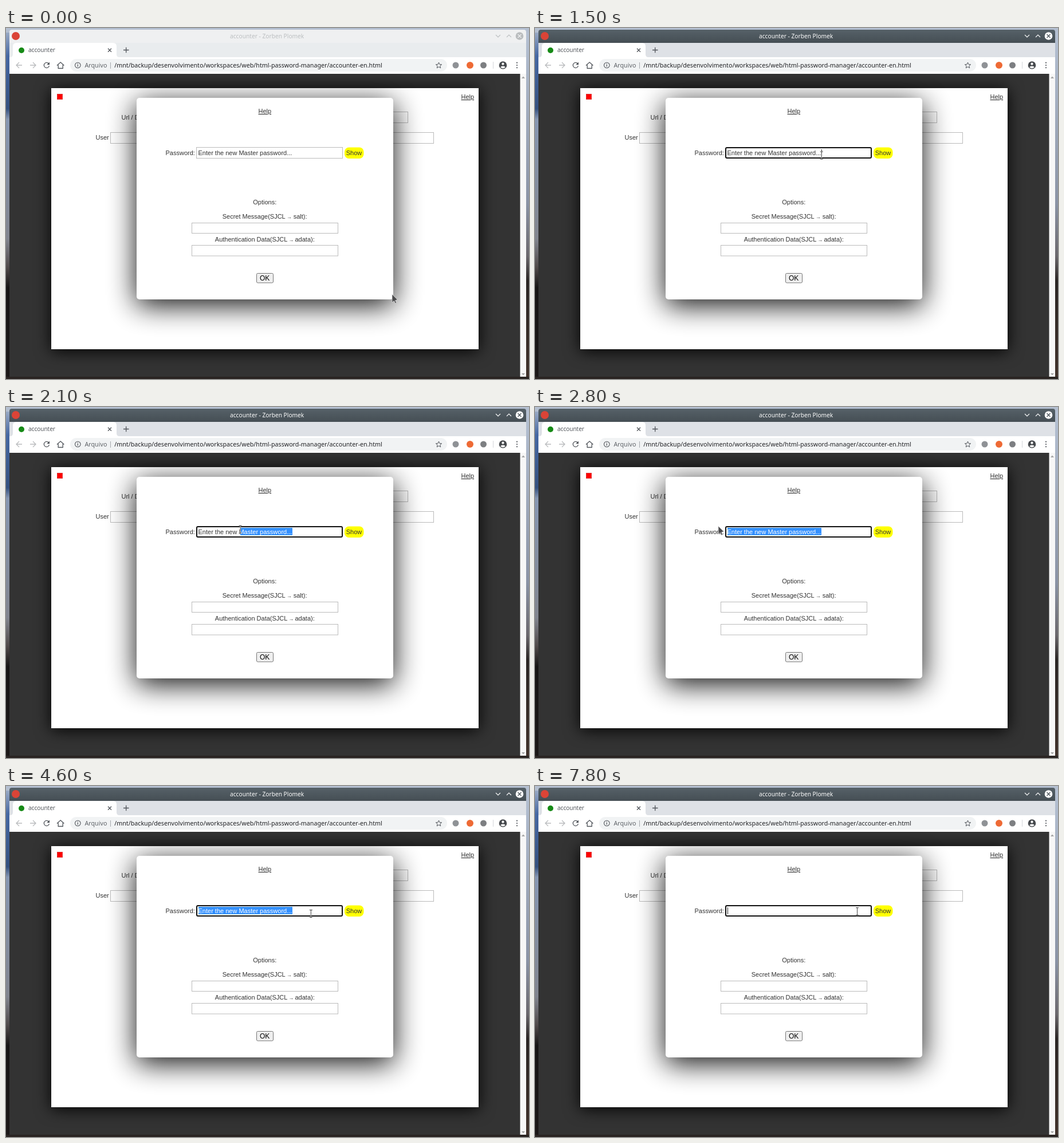
Animation, 913 px wide and 613 px high, one loop 8000 ms. Source, as an HTML page:

```html
<!DOCTYPE html>
<html lang="en">
<head>
<meta charset="utf-8">
<title>accounter</title>
<style>
html, body { margin: 0; width: 100%; height: 100%; overflow: hidden; background: #333; }
svg { display: block; }
text { font: 11px "Liberation Sans", Arial, sans-serif; fill: #333; white-space: pre; }
.ui { font-family: "Noto Sans", sans-serif; }
.link { text-decoration: underline; }
.field { fill: #fff; stroke: #bbb; }
.arrow { font-size: 9px; text-anchor: middle; }
.icon { fill: none; stroke: #50545a; stroke-width: 1.3; }
#frame { --bar: #eff0f1; --strip: #e9ecee; --ink: #bcbfc1; --disc: #b9bcbe; --cross: #eff0f1; }
#frame.active { --bar: url(#steel); --strip: #dee1e6; --ink: #fcfcfc; --disc: #fcfcfc; --cross: #475057; }
</style>
</head>
<body>
<svg width="913" height="613" viewBox="0 0 913 613">
  <defs>
    <linearGradient id="steel" x2="0" y2="1">
      <stop stop-color="#566168"/><stop offset="1" stop-color="#454e54"/>
    </linearGradient>
    <linearGradient id="skyL" x2="0" y2="1">
      <stop stop-color="#a9b6ca"/><stop offset=".08" stop-color="#4668a3"/>
      <stop offset=".23" stop-color="#35517f"/><stop offset=".26" stop-color="#8797b2"/>
      <stop offset=".6" stop-color="#82858f"/><stop offset=".68" stop-color="#514b4b"/>
      <stop offset=".74" stop-color="#171515"/><stop offset="1" stop-color="#1c1818"/>
    </linearGradient>
    <linearGradient id="skyR" x2="0" y2="1">
      <stop stop-color="#b6c2d4"/><stop offset=".5" stop-color="#8a93a5"/>
      <stop offset=".65" stop-color="#6a676c"/><stop offset=".72" stop-color="#2a2524"/>
      <stop offset="1" stop-color="#41322b"/>
    </linearGradient>
    <clipPath id="selClip"><rect id="selBox" y="211" height="13"/></clipPath>
  </defs>

  <!-- page -->
  <rect width="913" height="613" fill="#333"/>
  <rect x="79" y="108" width="746" height="456" style="filter:blur(14px)"/>
  <rect x="79" y="105" width="746" height="456" fill="#fff"/>
  <rect x="89.5" y="115.5" width="9" height="9" fill="red" stroke="#d33"/>
  <text class="link" x="794.5" y="124">Help</text>
  <text x="201.5" y="160">Url / Domain</text>
  <rect class="field" x="270.5" y="146.5" width="431" height="19"/>
  <text x="156.5" y="195">User</text>
  <rect class="field" x="182.5" y="182.5" width="564" height="19"/>

  <!-- dialog -->
  <rect x="228" y="132" width="448" height="352" opacity=".95" style="filter:blur(25px)"/>
  <rect x="228" y="122" width="448" height="352" rx="5" fill="#fff"/>
  <text class="link" x="440.5" y="149">Help</text>
  <text x="278.5" y="222">Password:</text>
  <rect class="field" id="idle" x="332.5" y="208.5" width="255" height="19"/>
  <rect id="focus" x="333" y="209" width="254" height="18" rx="2" fill="#fff" stroke="#101010" stroke-width="2"/>
  <g id="prompt">
    <text x="335.5" y="221.5">Enter the new Master password...</text>
    <g clip-path="url(#selClip)">
      <rect x="336" y="211" width="164" height="13" fill="#3390ff"/>
      <text x="335.5" y="221.5" style="fill:#fff">Enter the new Master password...</text>
    </g>
  </g>
  <rect id="caret" y="212" width="1" height="12" fill="#222"/>
  <rect x="591" y="208.5" width="33.5" height="19.5" rx="7.5" fill="#ff0"/>
  <text x="593.7" y="221.5">Show</text>
  <text x="431.3" y="308">Options:</text>
  <text x="377.7" y="333">Secret Message(SJCL</text>
  <text class="arrow" x="494.5" y="333">→</text>
  <text x="501.7" y="333">salt):</text>
  <rect class="field" x="324.5" y="340.5" width="255" height="18"/>
  <text x="364.8" y="373">Authentication Data(SJCL</text>
  <text class="arrow" x="498" y="373">→</text>
  <text x="504.5" y="373">adata):</text>
  <rect class="field" x="324.5" y="379.5" width="255" height="18.5"/>
  <rect x="437.5" y="428.5" width="29" height="16.5" rx="2" fill="#efefef" stroke="#767676"/>
  <text x="443" y="440.5" style="font-size:12px;fill:#000">OK</text>

  <!-- scrollbar -->
  <rect x="897.5" y="80" width="10.5" height="530" fill="#f7f7f7"/>
  <path d="M900 88l3-3.5 3 3.5zM900 603l3 3.5 3-3.5z" fill="#a5a5a5"/>

  <!-- desktop -->
  <rect width="6" height="613" fill="url(#skyL)"/>
  <rect x="908" width="5" height="613" fill="url(#skyR)"/>
  <rect width="913" height="8" fill="#b4bfd0"/>
  <rect y="609" width="913" height="4" fill="#2a2422"/>

  <!-- window frame -->
  <g id="frame">
    <path d="M6 26V7q0-4 4-4H904q4 0 4 4V26z" fill="var(--bar)"/>
    <circle cx="17" cy="14" r="7" fill="#db4437"/>
    <text class="ui" x="391" y="18" style="font-size:10.2px;fill:var(--ink)">accounter - Zorben Plomek</text>
    <path d="M855 12l4 4 4-4M874 16l4-4 4 4" fill="none" stroke="var(--ink)" stroke-width="1.1"/>
    <circle cx="896.5" cy="14" r="6.8" fill="var(--disc)"/>
    <path d="M893.5 11l6 6m0-6l-6 6" stroke="var(--cross)" stroke-width="1.2"/>
    <rect x="6" y="26" width="902" height="25" fill="var(--strip)"/>
  </g>
  <path d="M7 51q5 0 5-5V32q0-6 6-6H187q6 0 6 6V46q0 5 5 5z" fill="#fff"/>
  <circle cx="27" cy="39" r="5" fill="#168a16"/>
  <text class="ui" x="39" y="42.3" style="font-size:10px;fill:#55595e">accounter</text>
  <path class="icon" d="M178 35.8l6 6m0-6l-6 6M205 38.5h9.5M209.7 33.8v9.5"/>

  <!-- toolbar -->
  <rect x="6" y="51" width="902" height="29" fill="#fff"/>
  <rect x="112" y="54" width="658" height="22" rx="11" fill="#f1f3f4"/>
  <path class="icon" style="stroke:#babcbe" d="M28 65H18.5M23 60l-5 5 5 5M42 65h9.5M47 60l5 5-5 5"/>
  <path class="icon" d="M74.8 62.5A4.6 4.6 0 1 0 75.4 66.2"/>
  <path d="M76 59.5v4.8h-4.8z" fill="#50545a"/>
  <path class="icon" d="M89 65.5l6.2-5.7 6.2 5.7M91.2 64.5v6h8v-6"/>
  <circle class="icon" cx="125.3" cy="65" r="4.8" style="stroke-width:1.1"/>
  <path class="icon" d="M125.3 64.3v3.2M125.3 62v1.3"/>
  <text class="ui" x="137.5" y="68.5" style="font-size:10.7px;fill:#5f6368">Arquivo</text>
  <path d="M182.5 60v11" stroke="#a5a8ac"/>
  <text class="ui" x="189.3" y="68.5" style="font-size:10.7px;fill:#202124">/mnt/backup/desenvolvimento/workspaces/web/html-password-manager/accounter-en.html</text>
  <path class="icon" style="stroke-width:1" d="M755.5 60l1.4 3.5 3.7.3-2.8 2.4.9 3.7-3.2-2-3.2 2 .9-3.7-2.8-2.4 3.7-.3z"/>
  <circle cx="785" cy="65" r="5.5" fill="#8f9296"/>
  <circle cx="810" cy="65" r="6" fill="#ee6a35"/>
  <circle cx="833.5" cy="65" r="5.5" fill="#7d7f82"/>
  <path d="M850.5 59v12" stroke="#d4d6d9"/>
  <circle cx="867.5" cy="65" r="6.8" fill="#46494d"/>
  <path d="M863.2 68.6a4.5 2.9 0 0 1 8.6 0a6 6 0 0 1-8.6 0z" fill="#fff"/>
  <circle cx="867.5" cy="62.7" r="2.1" fill="#fff"/>
  <path d="M892 60.7h.01M892 65h.01M892 69.3h.01" stroke="#50545a" stroke-width="2.2" stroke-linecap="round"/>

  <!-- pointers -->
  <path id="arrow" d="M0 0V14.5L3.4 11.6 5.6 16 7.6 15 5.6 10.8 9.4 9.6z" fill="#4a4a4c" stroke="#e8e8e8" stroke-width=".7"/>
  <g id="beam" fill="none">
    <path d="M-2.5-6.5h5M-2.5 6.5h5M0-6.5v13" stroke="#fff" stroke-width="2.2" opacity=".7"/>
    <path d="M-2.5-6.5h5M-2.5 6.5h5M0-6.5v13" stroke="#444"/>
  </g>
</svg>
<script>
const LOOP = 8000, STEP = 100;
const ACTIVATE = 1500, DRAG = 1700, ALL = 2400, RELEASE = 2800, CLEAR = 7800;
const $ = id => document.getElementById(id);

// pointer path: time, x, y
const path = [
  [200, 674, 465], [300, 664, 446], [600, 566, 305], [900, 495, 236], [1000, 491, 226],
  [1100, 500.5, 222.5], [1200, 501.5, 224], [1400, 501.5, 224], [1600, 499, 221],
  [1700, 491, 220], [2000, 432, 215], [2300, 363, 211], [2400, 343, 209], [2700, 343, 209],
  [2800, 320, 208], [3200, 320, 208], [3300, 326, 214], [3500, 392, 243], [3800, 492, 234],
  [4100, 507.5, 223], [4200, 507, 223.5], [4400, 507, 223.5], [4500, 514, 225],
  [4800, 569, 219], [5000, 569, 219], [5100, 568.5, 219], [5200, 568.5, 219],
  [5300, 567.5, 219], [5400, 567.5, 219], [5500, 564.5, 219], [5600, 562.5, 219]
];

function pointerAt(t) {
  const i = path.findIndex(p => p[0] >= t);
  if (i < 0) return path.at(-1).slice(1);
  if (i === 0) return path[0].slice(1);
  const [a, b] = [path[i - 1], path[i]];
  const k = (t - a[0]) / (b[0] - a[0]);
  return [a[1] + (b[1] - a[1]) * k, a[2] + (b[2] - a[2]) * k];
}

const show = (id, on) => $(id).setAttribute("visibility", on ? "visible" : "hidden");

function draw(now) {
  const t = Math.floor(now % LOOP / STEP) * STEP;
  const [x, y] = pointerAt(t);
  const active = t >= ACTIVATE, selected = t >= DRAG && t < CLEAR;
  const inField = x > 333 && x < 588 && y > 208 && y < 228;
  const beam = inField || (t >= ACTIVATE && t < RELEASE);

  $("frame").classList.toggle("active", active);
  show("idle", !active);
  show("focus", active);
  $("prompt").style.display = t < CLEAR ? "" : "none";

  const left = !selected ? 500 : t >= ALL ? 336 : x;
  $("selBox").setAttribute("x", left);
  $("selBox").setAttribute("width", 500 - left);
  show("caret", active && !selected);
  $("caret").setAttribute("x", t < CLEAR ? 500 : 336);

  show("arrow", !beam);
  show("beam", beam);
  $(beam ? "beam" : "arrow").setAttribute("transform", `translate(${x} ${y})`);
  requestAnimationFrame(() => draw(performance.now()));
}
draw(0);
</script>
</body>
</html>
```
